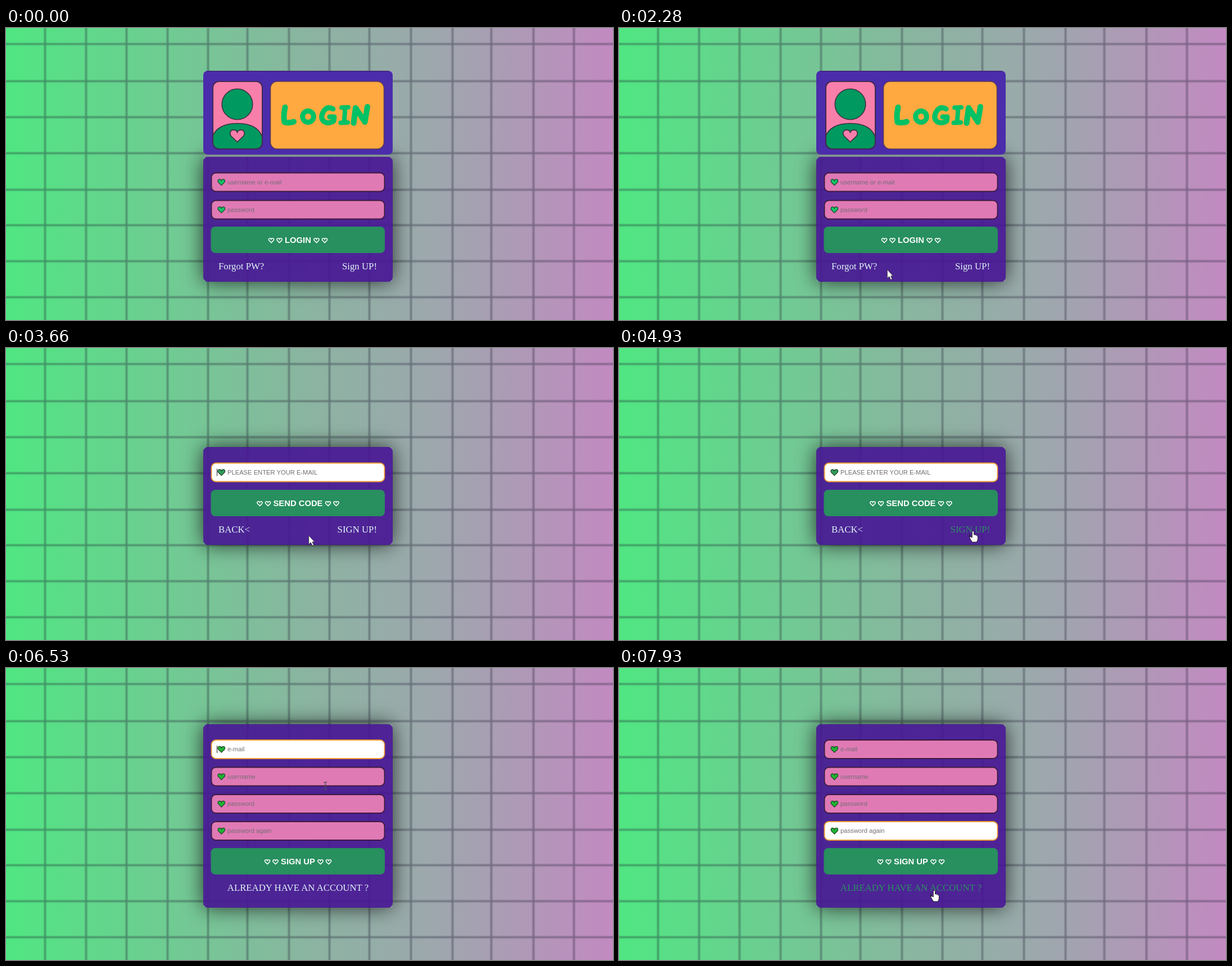
An HTML page for the animation above (8000 ms loop, 1080 by 519 pixels).

```html
<!DOCTYPE html>
<html lang="en">
<head>
<meta charset="utf-8">
<title>Login forms</title>
<style>
  html, body { margin: 0; width: 100%; height: 100%; overflow: hidden; }
  svg { display: block; width: 100%; height: 100%; }
  .hint { font: 11.2px "Liberation Sans", Arial, sans-serif; fill: #756d73; }
  .label { font: bold 14.8px "Liberation Sans", Arial, sans-serif; fill: #fff; text-anchor: middle; }
  .link { font: 16.8px "Liberation Serif", "Times New Roman", serif; fill: #e0f6f6; }
  .link.hover { fill: #2a9161; }
  .button { fill: #288f5f; }
  .button.hover { fill: #33a26d; }
</style>
</head>
<body>
<svg id="stage" viewBox="0 0 1080 519" preserveAspectRatio="none"></svg>
<script>
const LOOP = 8000;
const FADE = 300;
const PINK = [224, 122, 181], WHITE = [255, 255, 255];
const DARK = [62, 26, 62], ORANGE = [238, 154, 50];
const HEART = 'M0 5.6L-5.4 .4C-7.4-2.2-6-5.2-3.3-5.2C-1.6-5.2-.4-4.2 0-3C.4-4.2 1.6-5.2 3.3-5.2C6-5.2 7.4-2.2 5.4 .4Z';

const verticals = [69, 142, 214, 287, 359, 429, 503, 575, 646, 720, 794, 863, 938, 1010];
const horizontals = [28, 94, 158, 222, 287, 350, 414, 478];

// Links: [text, left, right, anchor, baseline]
const scenes = [
  { id: 'login', from: 0, top: 229, bottom: 451, heart: '#16c264',
    fields: [[257, 'username or e-mail'], [306, 'password']],
    button: [353, 'LOGIN', 23.5],
    links: [['Forgot PW?', 378, 460, 'start', 429], ['Sign UP!', 598, 660, 'end', 429]] },
  { id: 'reset', from: 2700, top: 176, bottom: 350, heart: '#2e9d5a',
    fields: [[204, 'PLEASE ENTER YOUR E-MAIL']],
    button: [252, 'SEND CODE', 44],
    links: [['BACK<', 378, 434, 'start', 328], ['SIGN UP!', 590, 660, 'end', 328]] },
  { id: 'signup', from: 5190, top: 100, bottom: 426, heart: '#20b433',
    fields: [[127.5, 'e-mail'], [176, 'username'], [224.5, 'password'], [272.5, 'password again']],
    button: [320, 'SIGN UP', 30.5],
    links: [['ALREADY HAVE AN ACCOUNT ?', 393, 646, 'middle', 395.5]] }
];

// Focus periods; blink is the start of the caret's 500 ms on/off cycle
const focuses = [
  { scene: 1, field: 0, from: 2400, to: 5190, blink: 2430 },
  { scene: 2, field: 0, from: 5190, to: 6620, blink: 5300 },
  { scene: 2, field: 1, from: 6620, to: 7480, blink: 6620 },
  { scene: 2, field: 3, from: 7480, to: 9000, blink: 7430 }
];

// Pointer path: [time, x, y]
const path = [
  [330, 1041, 501], [400, 850, 440], [470, 676, 374], [540, 638, 378],
  [1080, 636, 380], [1150, 626, 392], [1215, 617, 406], [1285, 617, 406], [1430, 627, 426],
  [1750, 627, 426], [1950, 585, 429], [2250, 485, 430], [2510, 420, 425],
  [2570, 420, 425], [2585, 423, 426], [2690, 423, 426], [2725, 437, 339],
  [2810, 437, 339], [3250, 441, 337], [3600, 520, 335], [3900, 612, 327], [4070, 630, 325],
  [6200, 630, 325], [6270, 619, 314], [6340, 595, 280], [6410, 558, 264],
  [6480, 572, 217], [6600, 563, 199], [7000, 563, 199], [7070, 561, 232],
  [7140, 560, 277], [7300, 560, 280], [7330, 556, 287], [7520, 556, 287],
  [7600, 558, 345], [7730, 561, 395], [8000, 561, 395]
];

function box(x, y, w, h, r, extra) {
  return `<rect x="${x}" y="${y}" width="${w}" height="${h}" rx="${r}" ${extra}/>`;
}

function fieldMarkup([y, text], heart) {
  return box(365.5, y + .5, 308, 33, 8, 'class="field" stroke-width="1.8"') +
    `<path d="${HEART}" transform="translate(383.3 ${y + 17})" fill="${heart}" stroke="#203c28" stroke-width="1.2"/>
     <text class="hint" x="394" y="${y + 20.8}">${text}</text>`;
}

function buttonMarkup([y, text, half]) {
  const hearts = [-half - 24, -half - 9.5, half + 9.5, half + 24].map(dx =>
    `<path d="${HEART}" transform="translate(${519.5 + dx} ${y + 24.5}) scale(.72)" fill="none" stroke="#fff" stroke-width="2.2"/>`);
  return box(364.5, y, 309.5, 47, 8, 'class="button"') + hearts.join('') +
    `<text class="label" x="519.5" y="${y + 29.3}">${text}</text>`;
}

function linkMarkup([text, left, right, anchor, y]) {
  const x = { start: left, end: right, middle: (left + right) / 2 }[anchor];
  return `<text class="link" x="${x}" y="${y}" text-anchor="${anchor}">${text.replace('<', '&lt;')}</text>`;
}

function bannerMarkup() {
  const frame = 'fill="none" stroke="#42294f" stroke-width="2"';
  return box(351, 225, 337, 4, 0, 'fill="#829291"') +
    box(351, 76, 337, 149, 8, 'fill="#4b2cab"') +
    '<path d="M358 76.6H681" stroke="#3c2268" stroke-width="1.4"/>' +
    box(368, 95, 88, 120, 11, 'fill="#f97fab"') +
    `<g clip-path="url(#portrait)" fill="#00995f" stroke="#3d3240" stroke-width="1.6">
      <circle cx="411.5" cy="135.5" r="27.3"/>
      <path d="M366 200C369 176 392 169.500 411.500 169.500C432 169.500 454 176 457 200V218H366Z"/>
      <path d="${HEART}" transform="translate(411.500 191.500) scale(2)" fill="#f97fab" stroke-width=".8"/>
    </g>` +
    box(368, 95, 88, 120, 11, frame) +
    box(470.5, 95, 202, 120, 12, 'fill="#ffa940" stroke="#5a3a55" stroke-width="1.5"') +
    `<g fill="none" stroke="#00c165" stroke-width="10" stroke-linecap="round" stroke-linejoin="round">
      <path d="M496.500 141Q493 157 495.500 167.500Q504 169.500 512 166.500"/>
      <ellipse cx="537.500" cy="157.500" rx="9.800" ry="10" stroke-width="9"/>
      <path d="M582 144Q572 138 565 148Q558 160 566 166.500Q574 171 583 165.500L584 158H576" stroke-width="9"/>
      <path d="M597 141.500L609 141M603.500 142L601.500 168M595.500 168.500L608 168" stroke-width="8"/>
      <path d="M618.500 169L622 142L638.500 167L643 140"/>
    </g>`;
}

function sceneMarkup(s) {
  const h = s.bottom - s.top;
  return `<g id="${s.id}">
    <clipPath id="${s.id}-outside"><path clip-rule="evenodd" d="M0 0H1080V519H0ZM352 ${s.top + 1}h335v${h - 2}h-335Z"/></clipPath>
    <g clip-path="url(#${s.id}-outside)">${box(351, s.top, 337, h, 8, 'fill="#000" fill-opacity=".72" filter="url(#shadow)"')}</g>
    ${box(351, s.top, 337, h, 8, 'fill="rgb(71,20,149)" fill-opacity=".9"')}
    ${s.id === 'login' ? bannerMarkup() : ''}
    ${s.fields.map(f => fieldMarkup(f, s.heart)).join('')}
    ${buttonMarkup(s.button)}${s.links.map(linkMarkup).join('')}</g>`;
}

const stage = document.getElementById('stage');
stage.innerHTML = `
  <defs>
    <linearGradient id="sky"><stop offset="0" stop-color="#50e682"/><stop offset=".5" stop-color="#8bb4a1"/>
      <stop offset=".72" stop-color="#9fa6ae"/><stop offset="1" stop-color="#c28ac1"/></linearGradient>
    <filter id="shadow" x="-30%" y="-50%" width="160%" height="200%"><feGaussianBlur stdDeviation="18"/></filter>
    <filter id="soft" filterUnits="userSpaceOnUse" x="0" y="0" width="1080" height="519"><feGaussianBlur stdDeviation=".8"/></filter>
    <clipPath id="portrait">${box(368, 95, 88, 120, 11, '')}</clipPath>
  </defs>
  ${box(0, 0, 1080, 519, 0, 'fill="url(#sky)"')}
  <path d="${verticals.map(x => `M${x + .5} -5V525`).join('') + horizontals.map(y => `M-5 ${y + .5}H1085`).join('')}"
    stroke="#20202f" stroke-opacity=".4" stroke-width="3" filter="url(#soft)"/>
  ${scenes.map(sceneMarkup).join('')}
  <path id="caret" stroke="#222" stroke-width="1"/>
  <g id="pointer">
    <path id="arrow" d="M0 0V15.500L3.600 12.300L6.300 18L8.800 16.900L6.300 11.300H10.500Z" fill="#fff" stroke="#222" stroke-width=".8"/>
    <path id="hand" d="M-1.800 1.500Q0-1 1.600 1.500V7Q3.500 5.800 4.300 7.600Q6.300 6.800 6.700 8.600Q8.300 8.300 8.400 10.500V14.500Q8 17 6.500 20H-1.500Q-3.500 17-6 12.500Q-6-.0-6 11Q-4.500 9.500-1.800 12Z" fill="#fff" stroke="#222" stroke-width="1"/>
    <path id="beam" d="M-3-6.500H-1L0-5.500L1-6.500H3M0-5.500V5.500M-3 6.500H-1L0 5.500L1 6.500H3" fill="none" stroke="#4b4b50" stroke-width="1.3"/>
  </g>`;

const find = id => document.getElementById(id);
const show = (node, on) => node.setAttribute('display', on ? 'inline' : 'none');
for (const s of scenes) {
  s.node = find(s.id);
  s.fieldNodes = [...s.node.querySelectorAll('.field')];
  s.buttonNode = s.node.querySelector('.button');
  s.linkNodes = [...s.node.querySelectorAll('.link')];
}

const clamp = v => Math.max(0, Math.min(1, v));
const mix = (a, b, k) => `rgb(${a.map((v, i) => Math.round(v + (b[i] - v) * k))})`;

function pointerAt(t) {
  const i = path.findIndex(p => p[0] > t);
  if (i < 1) return path[path.length - 1].slice(1);
  const [t0, x0, y0] = path[i - 1], [t1, x1, y1] = path[i];
  const k = (t - t0) / (t1 - t0);
  return [x0 + (x1 - x0) * k, y0 + (y1 - y0) * k];
}

function fieldGlow(scene, field, t) {
  const f = focuses.find(f => f.scene === scene && f.field === field);
  return f ? clamp((t - f.from) / FADE) - clamp((t - f.to) / FADE) : 0;
}

function draw(t) {
  const index = scenes.findLastIndex(s => t >= s.from);
  const scene = scenes[index];
  scenes.forEach(s => show(s.node, s === scene));
  scene.fieldNodes.forEach((node, i) => {
    const glow = fieldGlow(index, i, t);
    node.setAttribute('fill', mix(PINK, WHITE, glow));
    node.setAttribute('stroke', mix(DARK, ORANGE, glow));
  });

  const focus = focuses.find(f => f.scene === index && t >= f.from && t < f.to);
  const lit = focus && (t < focus.blink || Math.floor((t - focus.blink) / 500) % 2 === 0);
  show(find('caret'), lit);
  if (lit) find('caret').setAttribute('d', `M375.500 ${scene.fields[focus.field][0] + 10.5}v13`);

  // A resting pointer keeps its hand after the page changes
  const [x, y] = pointerAt(t);
  const resting = index === 2 && t < 6245;
  const visible = t >= 330;
  const inside = (l, r, top, bottom) => visible && !resting && x >= l && x <= r && y >= top && y <= bottom;
  const onButton = inside(364, 674, scene.button[0], scene.button[0] + 47);
  const onField = scene.fields.some(f => inside(365, 674, f[0], f[0] + 34));
  let onLink = false;
  scene.linkNodes.forEach((node, i) => {
    const [, left, right, , base] = scene.links[i];
    const over = inside(left, right, base - 15, base + 4);
    node.classList.toggle('hover', over);
    onLink = onLink || over;
  });
  scene.buttonNode.classList.toggle('hover', onButton);

  const kind = resting || onButton || onLink ? 'hand' : onField ? 'beam' : 'arrow';
  show(find('pointer'), visible);
  ['arrow', 'hand', 'beam'].forEach(id => show(find(id), id === kind));
  find('pointer').setAttribute('transform', `translate(${x} ${y})`);
}

const start = performance.now();
function tick(now) {
  draw(Math.max(0, now - start) % LOOP);
  requestAnimationFrame(tick);
}
draw(0);
requestAnimationFrame(tick);
</script>
</body>
</html>
```
